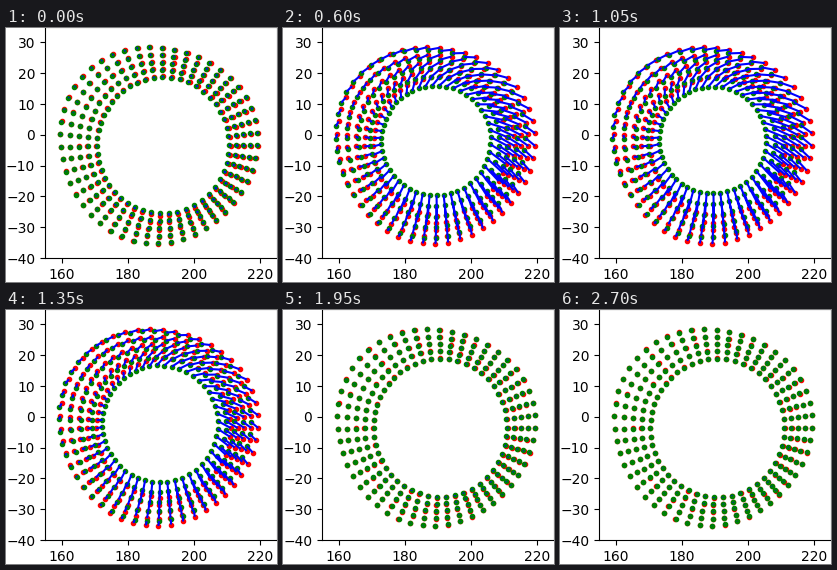
A matplotlib script that plays this animation: 271x254 px, repeating every 2850 ms.

```python
import numpy as np
import matplotlib.pyplot as plt
from matplotlib.animation import FuncAnimation

W, H, DPI = 271, 254, 100
LEFT, BASE = 39, 230                # axes corner, in pixels from the top left
AX_W, AX_H = 232, 231
X_LIM, Y_LIM = (155, 225), (-40, 35)

FRAMES, INTERVAL = 19, 150
SPOKES, RINGS = 49, 5
CENTER_X, CENTER_Y = 157.5, 118


def inner_radius(a):
    return 68.5 - 1.2 * np.cos(2 * a)


def outer_radius(a):
    """A circle pushed off centre, with a slight three-cornered bulge."""
    return (98.3 - 5.5 * np.cos(a) - 2.2 * np.sin(a)
            + 0.4 * np.cos(2 * a) + 0.4 * np.sin(2 * a)
            + 1.5 * np.cos(3 * a) - 1.9 * np.sin(3 * a))


def equal_arc_angles(count):
    fine = np.linspace(0, 2 * np.pi, 2001)
    r = outer_radius(fine)
    steps = np.hypot(np.diff(r * np.cos(fine)), np.diff(r * np.sin(fine)))
    arc = np.concatenate([[0], np.cumsum(steps)])
    return np.interp(np.arange(count) / count * arc[-1], arc, fine)


def ease(t):
    return 0.5 - 0.5 * np.cos(np.pi * np.clip(t, 0, 1))


def contraction(step):
    """Quick squeeze, short hold, quick release, then a slow settling."""
    rest = 0.08 - 0.003 * step
    pulse = ease((step + 0.5) / 5.6) * (1 - ease((step - 7) / 5.2))
    return rest + (1 - rest) * pulse


theta = equal_arc_angles(SPOKES)[:, None]
depth = np.linspace(0, 1, RINGS)[None, :]      # 0 inner wall, 1 outer wall


def blend(inner, outer):
    return inner + (outer - inner) * depth


def positions(squeeze):
    """Data coordinates of all points; 0 is at rest, 1 fully contracted."""
    radius = blend(inner_radius(theta), outer_radius(theta))
    radius = radius - squeeze * blend(inner_radius(theta) - 53.5, 4.5)
    angle = theta - 0.07 * squeeze
    px = CENTER_X - squeeze * blend(5, 6) + radius * np.cos(angle)
    py = CENTER_Y - squeeze * blend(6, 2.5) + radius * np.sin(angle)
    x = X_LIM[0] + (px - LEFT) * (X_LIM[1] - X_LIM[0]) / AX_W
    y = Y_LIM[0] + (BASE - py) * (Y_LIM[1] - Y_LIM[0]) / AX_H
    return x.ravel(), y.ravel()


def joined(a, b):
    return np.column_stack([a, b, np.full(len(a), np.nan)]).ravel()


fig = plt.figure(figsize=(W / DPI, H / DPI), dpi=DPI, facecolor="white")
ax = fig.add_axes([LEFT / W, (H - BASE) / H, AX_W / W, AX_H / H])
ax.set(xlim=X_LIM, ylim=Y_LIM,
       xticks=range(160, 221, 20), yticks=range(-40, 31, 10))

rest_x, rest_y = positions(0)
ax.plot(rest_x, rest_y, ".", color="red")
tips, = ax.plot([], [], ".", color="green")
links, = ax.plot([], [], "-", color="blue", solid_capstyle="butt")


def draw(step):
    x, y = positions(contraction(step))
    tips.set_data(x, y)
    links.set_data(joined(rest_x, x), joined(rest_y, y))
    return tips, links


anim = FuncAnimation(fig, draw, frames=FRAMES, interval=INTERVAL,
                     repeat=True, repeat_delay=0)
plt.show()
```
